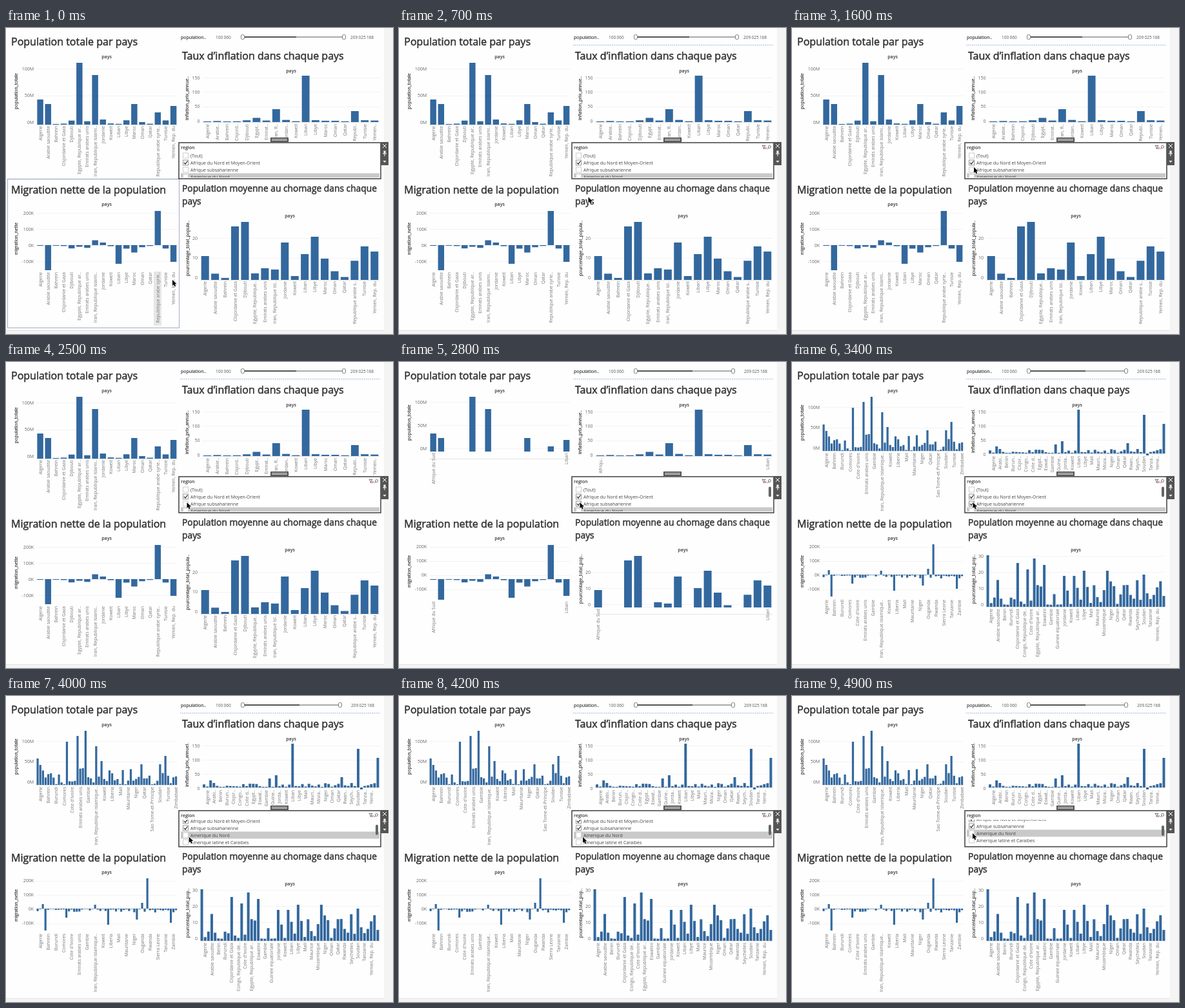
These frames come from a looping animation (600 by 475 pixels, 5000 ms). An HTML page with a canvas:

```html
<!DOCTYPE html>
<html lang="fr">
<head>
<meta charset="utf-8">
<style>
  html, body { margin: 0; width: 100%; height: 100%; overflow: hidden; background: #fefefe; }
  canvas { display: block; width: 600px; height: 475px; }
</style>
</head>
<body>
<canvas id="stage"></canvas>
<script>
const LOOP = 5000, FAMILY = '"Open Sans", "Noto Sans", sans-serif';
const canvas = document.getElementById('stage'), ctx = canvas.getContext('2d');
const ratio = window.devicePixelRatio || 1;
canvas.width = 600 * ratio;
canvas.height = 475 * ratio;
ctx.scale(ratio, ratio);

// Drawing helpers; "heavy" thickens the strokes to a medium weight
function text(s, x, y, { size = 7, color = '#555', weight = 400, heavy = 0, align = 'left', turned = false } = {}) {
  ctx.save();
  ctx.translate(x, y);
  if (turned) ctx.rotate(-Math.PI / 2);
  ctx.font = `${weight} ${size}px ${FAMILY}`;
  ctx.textAlign = align;
  ctx.fillStyle = ctx.strokeStyle = color;
  ctx.lineWidth = heavy;
  ctx.fillText(s, 0, size * 0.36);
  if (heavy) ctx.strokeText(s, 0, size * 0.36);
  ctx.restore();
}
function rect(x, y, w, h, color) {
  ctx.fillStyle = color;
  ctx.fillRect(x, y, w, h);
}
function frame(x, y, w, h, color, width = 1) {
  ctx.strokeStyle = color;
  ctx.lineWidth = width;
  ctx.strokeRect(x, y, w, h);
}
function line(points, color, width = 1, dash = []) {
  ctx.beginPath();
  points.forEach(([x, y]) => ctx.lineTo(x, y));
  ctx.setLineDash(dash);
  ctx.strokeStyle = color;
  ctx.lineWidth = width;
  ctx.stroke();
  ctx.setLineDash([]);
}
function shape(points, color) {
  ctx.beginPath();
  points.forEach(([x, y]) => ctx.lineTo(x, y));
  ctx.closePath();
  ctx.fillStyle = color;
  ctx.fill();
}

// Bar heights in pixels: seeded small values between low and high, with a few notable peaks
function bars(count, low, high, peaks) {
  return Array.from({ length: count }, (_, i) => {
    const noise = Math.abs(Math.sin(i * 12.9898 + count) * 43758.5453) % 1;
    return peaks[i] ?? low + (high - low) * noise ** 2;
  });
}
const before = {
  total: bars(18, 1, 10, { 0: 39, 1: 32, 5: 96, 7: 77, 12: 32, 15: 19, 17: 29 }),
  inflation: bars(18, 1, 4, { 5: 6.5, 7: 20, 10: 72, 15: 17 }),
  migration: bars(18, -1, -8, { 1: -39, 7: 7.5, 8: 4, 10: -29, 12: -11.5, 15: 53, 17: -26 }),
  unemployment: bars(18, 3, 35, { 0: 37, 3: 83, 4: 90, 8: 58, 10: 40, 11: 67, 12: 33, 16: 52, 17: 44 })
};
const after = {
  total: bars(53, 1, 26, { 0: 41, 1: 31, 11: 67, 15: 76, 18: 84, 22: 60, 24: 37, 39: 32, 46: 32, 48: 45 }),
  inflation: bars(54, 1, 7, { 2: 11, 20: 14, 22: 19, 27: 68, 42: 16, 47: 60, 48: -3, 53: 46 }),
  migration: bars(54, -.5, -6, { 2: 7, 3: -34, 11: -14, 22: 6, 27: -25, 38: -17, 40: 9, 42: 47, 51: -22 }),
  unemployment: bars(54, 3, 42, { 0: 80, 9: 68, 12: 58, 14: 75, 17: 65, 23: 48, 26: 48, 29: 56, 36: 56, 47: 50 })
};

// Country labels: names, number of slots on the axis, first slot, step between labels
const start = 'Algerie|Arabie saoudite|Bahrein|Cisjordanie et Gaza|Djibouti|Egypte, Republique ar..|Emirats arabes unis|' +
  'Iran, Republique islami..|Jordanie|Koweit|Liban|Libye|Maroc|Oman|Qatar|Republique arabe syrie..|Tunisie|Yemen, Rep. du';
const labels = (names, slots = 18, first = 0, step = 1) => ({ names: names.split('|'), slots, first, step });
const ends = (name = 'Afrique du Sud') => labels(name + '|Liban', 18, 0, 17);
const names = {
  wide: labels(start),
  medium: labels(start.replace('lique ar..', 'lique..').replace('islami', 'isl').replace('syrie..', 's..')),
  short: labels('Algerie|Arabie..|Bahrein|Cisjord..|Djibouti|Egypt..|Emirat..|Iran, R..|Jordan..|Koweit|Liban|Libye|Maroc|' +
    'Oman|Qatar|Republ..|Tunisie|Yemen..'),
  total: labels("Algerie|Bahrein|Burundi|Comores|Cote d'Ivoire|Emirats arabes unis|Gambie|Iran, Republique islamique..|Koweit|" +
    'Liberia|Mali|Mauritanie|Niger|Qatar|Sao Tome-et-Principe|Soudan|Tunisie|Zimbabwe', 53, 1, 3),
  inflation: labels('Algerie|Arabi..|Benin|Burun..|Cisjor..|Congo..|Cote d..|Egypt..|Eswat..|Gambie|Guine..|Jorda..|Koweit|' +
    'Liban|Libye|Mali|Mauri..|Moza..|Niger|Oman|Qatar|Rwan..|Seych..|Soudan|Tanza..|Yeme..', 54, 1, 2),
  migration: labels("Algerie|Bahrein|Burundi|Comores|Cote d'Ivoire|Emirats arabes unis|Gambie|Iran, Republique islamique..|" +
    'Koweit|Liberia|Mali|Mauritanie|Niger|Ouganda|Rwanda|Sierra Leone|Tanzanie|Zambie', 54, 1, 3),
  sparse: labels('Algerie||Gambie|Niger', 3.235, -.353),
  unemployment: labels("Algerie|Arabie saoudite|Benin|Burundi|Cisjordanie et Gaza|Congo, Republique de..|Cote d'Ivoire|" +
    'Egypte, Republique ar..|Eswatini|Gambie|Guinee equatoriale|Jordanie|Koweit|Liban|Libye|Mali|Maurice|Mozambique|Niger|' +
    'Oman|Qatar|Rwanda|Seychelles|Soudan|Tanzanie|Yemen, Rep. du', 54, 1, 2)
};

function chart({ left, right, zero, bottom, values, ticks, tickY, country, countryY, axis, axisX, axisY }) {
  const marks = ticks.split(' ');
  marks.forEach((mark, i) => {
    const y = tickY[0] + (tickY[1] - tickY[0]) * i / (marks.length - 1);
    rect(left, Math.round(y), right - left, 1, '#f3f3f3');
    text(mark, left - 4, y, { align: 'right', color: '#666' });
  });
  rect(left, Math.round(zero), right - left, 1, '#e4e4e4');

  ctx.save();
  ctx.beginPath();
  ctx.rect(left, 0, right - left, bottom);
  ctx.clip();
  const pitch = (right - left) / values.length;
  values.forEach((v, i) => rect(left + pitch * (i + .11), zero - Math.max(v, 0), pitch * .78, Math.abs(v), '#33689e'));
  ctx.restore();

  const slot = (right - left) / country.slots;
  country.names.forEach((name, i) =>
    text(name, left + slot * (country.first + i * country.step + .5), countryY, { align: 'right', turned: true, color: '#777' }));
  text(axis, axisX, axisY, { size: 6.8, align: 'center', turned: true, color: '#333', heavy: .15 });
}

function charts(t) {
  const old = t < 2800, loading = !old && t < 3000, fresh = t >= 3000, done = t >= 3300;
  const pick = (a, b, c, d) => old ? a : loading ? b : done ? d : c;
  chart({
    left: 47, right: 265.7, zero: done ? 138 : 150, bottom: old ? 150 : 139,
    values: done ? after.total : before.total,
    ticks: '100M 50M 0M', tickY: pick([63, 146], [62, 134], [70, 133], [70, 133]),
    country: pick(names.wide, ends(), names.total, names.total), countryY: old ? 152 : 141,
    axis: 'population_totale', axisX: 16, axisY: old ? 98 : 94
  });
  chart({
    left: 304.5, right: 579, zero: fresh ? 142 : 146, bottom: 150,
    values: fresh ? after.inflation : before.inflation,
    ticks: '150 100 50 0', tickY: [77, fresh ? 143 : 144],
    country: pick(names.short, ends('Afriqu..'), names.inflation, names.inflation), countryY: fresh ? 146 : 149,
    axis: done ? 'inflation_prix_annuel.' : 'inflation_prix_annue..', axisX: 281, axisY: done ? 107 : 109
  });
  if (t < 200) rect(229, 378, 12, 84, '#e6e6e6');
  chart({
    left: 47, right: 265.7, zero: done ? 330 : 337, bottom: old ? 377 : 369,
    values: done ? after.migration : before.migration,
    ticks: '200K 100K 0K -100K', tickY: old ? [287, 362] : [286.5, 352.5],
    country: pick(names.wide, ends(), names.sparse, names.migration), countryY: pick(379, 372, 372, 369),
    axis: 'migration_nette', axisX: 16, axisY: old ? 327 : 325
  });
  chart({
    left: 301, right: 579, zero: done ? 380 : 391, bottom: old ? 391 : 381,
    values: done ? after.unemployment : before.unemployment,
    ticks: fresh ? '30 20 10 0' : '20 10 0', tickY: old ? [326, 387] : fresh ? [301, 376] : [326, 376],
    country: pick(names.medium, ends(), names.unemployment, names.unemployment), countryY: old ? 393 : 383,
    axis: old ? 'pourcentage_total_popula..' : 'pourcentage_total_pop..', axisX: 282, axisY: old ? 342 : 337
  });
}

function page() {
  rect(0, 0, 600, 475, '#fefefe');
  rect(586, 0, 14, 475, '#f4f4f4');
  rect(0, 470, 600, 5, '#f4f4f4');
  rect(0, 469, 586, 1, '#e2e2e2');
  const title = (s, x, y, size = 16) => text(s, x, y, { size, heavy: .5, color: '#333' });
  title('Population totale par pays', 8, 21.3);
  title('Taux d’inflation dans chaque pays', 273, 43);
  title('Migration nette de la population', 8, 251);
  title('Population moyenne au chomage dans chaque', 273, 249.5, 13.8);
  title('pays', 273, 269, 13.8);
  for (const [x, y] of [[156, 44], [442, 66], [156, 273], [440, 291]])
    text('pays', x, y, { align: 'center', weight: 600, color: '#333' });
}

function slider(t) {
  const end = t < 2800 ? 524 : 518, middle = t < 2800 ? 450 : 455;
  text('population..', 271, 14, { color: '#333', heavy: .15 });
  text('100\u2009060', 325, 14.5, { size: 6.5 });
  text('209\u2009025\u2009168', t < 2800 ? 534 : 535, 14.5, { size: 6.5 });
  rect(369, 13, end - 369, 2, '#aaa');
  rect(369, 13, middle - 369, 2, '#555');
  for (const x of [367, end]) {
    ctx.beginPath();
    ctx.roundRect(x - 2.5, 10.5, 5, 7, 2);
    ctx.fillStyle = '#fff';
    ctx.fill();
    ctx.strokeStyle = '#777';
    ctx.lineWidth = 1;
    ctx.stroke();
  }
  if (t >= 700) line([[270, 26.5], [580, 26.5]], '#a9bddd', 1, [2, 1]);
}

function checkbox(y, checked) {
  rect(274, y - 4.5, 9, 9, '#fff');
  frame(274.5, y - 4, 8, 8, checked ? '#999' : '#ccc');
  if (checked) line([[276, y], [278, y + 2.2], [281.5, y - 2.5]], '#333', 1.2);
}

function regionPanel(t) {
  rect(268, 178, 313, 56, '#fff');
  ctx.save();
  ctx.beginPath();
  ctx.rect(269, 192, 311, 40);
  ctx.clip();
  const scroll = at(scrollPath, t)[0];
  ['(Tout)', 'Afrique du Nord et Moyen-Orient', 'Afrique subsaharienne', 'Amerique du Nord', 'Amerique latine et Caraibes']
    .forEach((name, i) => {
      const y = 198 + 11 * i - scroll;
      if (i === 3) rect(271, y - 5.5, 308, 11, '#c9c9c9');
      checkbox(y, i === 1 || (i === 2 && t >= 2800));
      text(name, 286, y, { color: '#444' });
    });
  ctx.restore();
  if (t >= 2800) {
    ctx.beginPath();
    ctx.roundRect(573, 193.5 + scroll * .42, 4, 16, 2);
    ctx.fillStyle = '#666';
    ctx.fill();
  }
  text('region', 271, 185, { weight: 600, color: '#333' });
  if (t >= 700) {
    line([[563, 182.5], [568, 182.5], [566, 185], [566, 188], [565, 187], [565, 185], [563, 182.5]], '#555', .8);
    line([[567, 185], [570, 188]], '#c33', .9);
    line([[570, 185], [567, 188]], '#c33', .9);
    ctx.beginPath();
    ctx.arc(574.5, 184.5, 2, 0, 7);
    ctx.strokeStyle = '#555';
    ctx.lineWidth = .8;
    ctx.stroke();
    line([[573, 186], [571, 188]], '#555', .9);
  }
  frame(268, 178, 313, 56, '#4a4a4a', 1.6);

  rect(410, 170, 28, 7, '#555');
  rect(412, 172, 24, 1, '#ddd');
  rect(412, 174, 24, 1, '#ddd');
  rect(581, 177, 12, 36, '#555');
  line([[584, 180], [590, 186]], '#fff');
  line([[590, 180], [584, 186]], '#fff');
  rect(585.5, 190.5, 3, 4, '#fff');
  rect(584, 194.5, 6, 1, '#fff');
  rect(586.5, 195, 1, 4, '#fff');
  shape([[584.5, 206], [589.5, 206], [587, 209]], '#fff');
}

// Keyframes: time, then values, linear in between
const cursorPath = [[0, 258, 391], [100, 258, 391], [200, 298, 337], [300, 298, 337], [500, 295, 270], [600, 295, 270],
  [1200, 286, 225], [1600, 282, 216], [1800, 280.5, 218], [3500, 280.5, 218], [4200, 285, 219], [4500, 285, 219],
  [4900, 280, 213]];
const scrollPath = [[0, 0], [3500, 0], [3800, 13], [4000, 15], [4200, 15], [4400, 18]];
function at(path, t) {
  const next = path.findIndex(k => k[0] > t);
  if (next < 0) return path[path.length - 1].slice(1);
  const a = path[next - 1], b = path[next], p = (t - a[0]) / (b[0] - a[0]);
  return a.slice(1).map((v, i) => v + (b[i + 1] - v) * p);
}

function cursor(t) {
  const [x, y] = at(cursorPath, t);
  const arrow = [[0, 0], [0, 9], [2, 7.2], [3.6, 10.4], [5.2, 9.6], [3.8, 6.6], [6.6, 6.4]].map(([dx, dy]) => [x + dx, y + dy]);
  line([...arrow, arrow[0]], '#fff', 1.4);
  shape(arrow, '#000');
}

function draw(now) {
  const t = Math.floor(now % LOOP / 100) * 100;
  page();
  charts(t);
  slider(t);
  if (t < 200) {
    frame(2.5, 234.5, 266, 231, '#a3adc4');
    line([[2, 234.5], [268, 234.5]], '#7d93bd', 1, [2, 1]);
  }
  regionPanel(t);
  cursor(t);
}

const begin = performance.now();
function tick() {
  draw(performance.now() - begin);
  requestAnimationFrame(tick);
}
tick();
</script>
</body>
</html>
```
